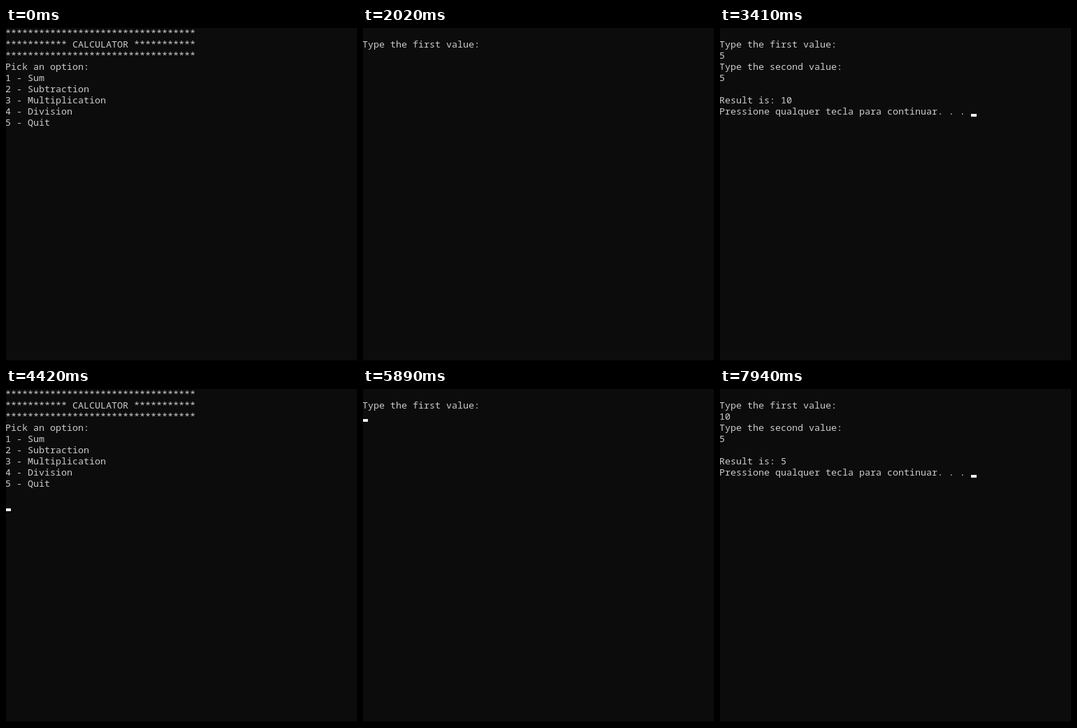
Write an HTML page with a canvas that moves like this. It is 502 px wide and 477 px high and loops after 8000 ms.

```html
<!DOCTYPE html>
<html lang="en">
<head>
<meta charset="utf-8">
<title>Console calculator</title>
<style>
  html, body { margin: 0; width: 100%; height: 100%; overflow: hidden; background: #0c0c0c; }
  canvas { display: block; }
</style>
</head>
<body>
<canvas id="screen" width="502" height="477"></canvas>
<script>
const ctx = document.getElementById('screen').getContext('2d', { alpha: false });
const LOOP = 8000;
const CELL_W = 8, CELL_H = 16;

const stars = n => '*'.repeat(n);
const menu = (choice = '') => [
  stars(34),
  `${stars(11)} CALCULATOR ${stars(11)}`,
  stars(34),
  'Pick an option:',
  '1 - Sum',
  '2 - Subtraction',
  '3 - Multiplication',
  '4 - Division',
  '5 - Quit',
  '',
  choice
];
const first = (a = '') => ['', 'Type the first value:', a];
const second = (a, b = '') => [...first(a), 'Type the second value:', b];
const result = (a, b, r) => [
  ...second(a, b),
  '',
  `Result is: ${r}`,
  'Pressione qualquer tecla para continuar. . . '
];

// Each step: start time, lines, cursor [column, row] when lit
const steps = [
  [0, menu()],
  [990, menu(), [0, 10]],
  [1150, menu('1'), [1, 10]],
  [1390, menu('1'), [0, 11]],
  [1460, first(), [0, 2]],
  [2020, first()],
  [2470, first('5'), [1, 2]],
  [2550, first('5')],
  [2720, second('5'), [0, 4]],
  [3100, second('5', '5'), [1, 4]],
  [3330, second('5', '5'), [0, 5]],
  [3410, result('5', '5', 10), [45, 7]],
  [4110, result('5', '5', 10)],
  [4350, []],
  [4420, menu(), [0, 10]],
  [4880, menu('2'), [1, 10]],
  [5200, menu('2')],
  [5740, menu('2'), [1, 10]],
  [5890, first(), [0, 2]],
  [6680, first('1'), [1, 2]],
  [6760, first('1')],
  [6830, first('10'), [2, 2]],
  [7150, second('10'), [0, 4]],
  [7540, second('10', '5'), [1, 4]],
  [7860, second('10', '5'), [0, 5]],
  [7940, result('10', '5', 5), [45, 7]]
];

const cellX = col => col * CELL_W - 1;
const cellY = row => row * CELL_H - 1;

function draw([, lines, cursor]) {
  ctx.fillStyle = '#0c0c0c';
  ctx.fillRect(0, 0, 502, 477);
  ctx.fillStyle = '#000';
  ctx.fillRect(0, 476, 502, 1);

  ctx.font = '13.333px "Noto Sans Mono", "DejaVu Sans Mono", monospace';
  ctx.textBaseline = 'alphabetic';
  ctx.fillStyle = '#ccc';
  lines.forEach((line, row) => ctx.fillText(line, cellX(0), cellY(row) + 13));

  if (cursor) {
    ctx.fillStyle = '#f2f2f2';
    ctx.fillRect(cellX(cursor[0]), cellY(cursor[1]) + 12, CELL_W, 4);
  }
}

const start = performance.now();
function tick() {
  const t = Math.max(0, performance.now() - start) % LOOP;
  draw(steps.findLast(step => step[0] <= t));
  requestAnimationFrame(tick);
}
tick();
</script>
</body>
</html>
```
